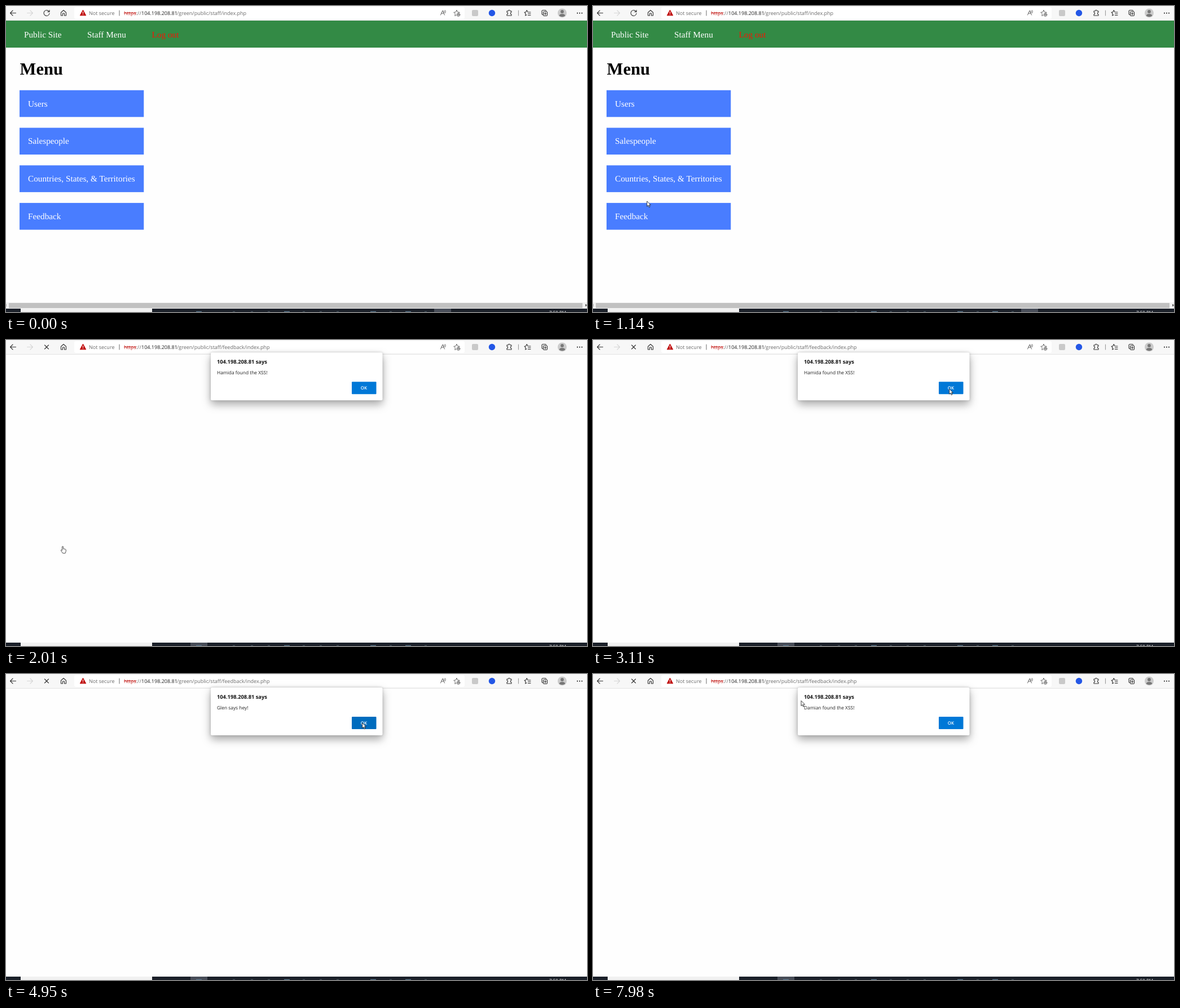
An HTML page for the animation above (8 s loop, 1030 px wide and 544 px high).

```html
<!DOCTYPE html>
<html lang="en">
<head>
<meta charset="utf-8">
<title>Staff menu</title>
<style>
html, body { margin: 0; width: 100%; height: 100%; overflow: hidden; background: #fefefe; }
svg { display: block; width: 1030px; height: 544px; }
text { font-family: "Open Sans", "Noto Sans", sans-serif; text-rendering: geometricPrecision; }
.page text { font: 15.25px "Liberation Serif", "Times New Roman", serif; fill: #fff; }
.page .title { font-size: 30.5px; font-weight: 700; fill: #000; }
.bar text { font-size: 9px; fill: #6a6a6a; }
.icon { fill: none; stroke: #333; stroke-width: 1.1; stroke-linecap: round; stroke-linejoin: round; }
.soft { stroke: #666; stroke-width: 1; }
.box { fill: #fff; filter: drop-shadow(0 7px 8px rgba(0,0,0,.3)) drop-shadow(0 0 2px rgba(0,0,0,.2)); }
</style>
</head>
<body>
<svg viewBox="0 0 1030 544">
  <rect width="1030" height="544" fill="#fefefe"/>

  <g class="bar">
    <rect width="1030" height="26" fill="#f7f7f7"/>
    <rect y="25" width="1030" height="1" fill="#e4e4e4"/>
    <rect x="121" y="2" width="692" height="21" rx="3" fill="#fff"/>
    <g class="icon">
      <path d="M17.500 12.500H7.500M12 8l-4.500 4.500L12 17"/>
      <path d="M37.500 12.500h10M43 8l4.500 4.500L43 17" stroke="#d6d6d6"/>
      <path id="reload" d="M76.500 10.300A5 5 0 1 0 77 13M77 7.300v3.200h-3.200"/>
      <path id="stop" d="M68.500 9l7 7m0-7l-7 7"/>
      <path d="M97.500 11.500l4.500-4 4.500 4V17h-3v-4h-3v4h-3z"/>
      <path d="M201 8v9" stroke="#777"/>
      <path class="soft" d="M770.500 16l3.500-8 3.500 8m-5.800-3h4.500M776.500 8.500q1.300 1 0 3M778.500 7.500q2 2 0 5"/>
      <path class="soft" id="star" d="M799 7.500l1.600 3.300 3.600.5-2.600 2.600M799 7.500l-1.600 3.300-3.600.5 2.600 2.600-.6 3.600 2-.9"/>
      <circle class="soft" cx="802" cy="15.500" r="2.800"/>
      <path class="soft" d="M800.500 15.500h3m-1.500-1.500v3"/>
      <path d="M888 9h2.300a1.700 1.700 0 0 1 3.400 0H896v2.300a1.700 1.700 0 0 0 0 3.400V17h-8v-2.300a1.700 1.700 0 0 0 0-3.400z"/>
      <path d="M908.500 8v9" stroke="#999"/>
      <path d="M926.500 11l-1.500-.3-1.700-3.200-1.600 3.200-2.700.5 2.200 2.300-.5 3.500 2.300-1.200M925.500 11h4.500M925.500 13.800h4.500M925.500 16.500h4.500"/>
      <path d="M951.500 15.500q-1.500 0-1.500-1.500V9.500q0-2 2-2h4q1.500 0 1.500 1.500"/>
      <rect x="952.500" y="10" width="7" height="7.500" rx="1.500"/>
      <path d="M954 13.700h4m-2-2v4"/>
    </g>
    <path d="M136.500 7.500l5 9.200h-10z" fill="#c00c0c" stroke="#c00c0c" stroke-width="1.200" stroke-linejoin="round"/>
    <path d="M136.500 10v3.700m0 1v1.200" stroke="#fff" stroke-width="1.100"/>
    <rect x="826" y="7" width="11" height="11" rx="2" fill="#c9c9c9"/>
    <circle cx="861.500" cy="12.500" r="5.700" fill="#2457e6"/>
    <circle cx="986" cy="12.500" r="8" fill="#cbcbcb"/>
    <circle cx="986" cy="10" r="2.900" fill="#777"/>
    <path d="M980.800 17.500q0-3.500 5.200-3.500t5.200 3.500q-5 3.500-10.400 0" fill="#777"/>
    <path d="M1012 11.700h2v1.700h-2zm4 0h2v1.700h-2zm4 0h2v1.700h-2z" fill="#333"/>
    <text x="147" y="15.800">Not secure</text>
    <text x="209" y="15.800"><tspan fill="#c5221f" text-decoration="line-through">https</tspan>://</text>
    <text x="240" y="15.800" style="fill:#222">104.198.208.81</text>
    <text x="303" y="15.800" id="path"></text>
  </g>

  <g class="page" id="page">
    <rect y="26" width="1030" height="48" fill="#338a45"/>
    <text x="32" y="56">Public Site</text>
    <text x="144" y="56">Staff Menu</text>
    <text x="258.500" y="56" style="fill:#f31505">Log out</text>
    <text x="24.500" y="122" class="title" letter-spacing=".1">Menu</text>
    <g id="items"></g>
    <rect y="527" width="1030" height="11" fill="#f1f1f1"/>
    <rect x="5" y="528" width="1017" height="9" fill="#c1c1c1"/>
    <path d="M0 530v4l-1-2zM1027.500 530v4l2-2z" fill="#444" stroke="#444" stroke-width=".6"/>
  </g>

  <g id="tasks">
    <rect y="538" width="1030" height="6" fill="#1b2029"/>
    <rect x="26" y="538" width="233" height="6" fill="#f1f1f1"/>
    <rect id="active" y="538" width="30" height="6" fill="#484d58"/>
    <text x="963" y="548" font-size="8" fill="#fff">7:50 PM</text>
  </g>

  <g id="dialog">
    <rect class="box" x="363" y="24" width="304.500" height="85" rx="2.500"/>
    <text x="374" y="44" font-size="9.300" font-weight="700" fill="#111">104.198.208.81 says</text>
    <text x="374" y="63" font-size="8.400" fill="#222" id="message"></text>
    <rect x="613" y="76" width="43.500" height="22" rx="1" id="ok"/>
    <text x="634.500" y="89.800" font-size="7.900" font-weight="600" fill="#fff" text-anchor="middle">OK</text>
  </g>

  <g id="cursor" stroke-linejoin="round">
    <path id="arrow" d="M0 0v9.200l2.100-2 1.600 3.600 1.500-.7-1.500-3.400h2.900z" fill="#fff" stroke="#111" stroke-width=".8"/>
    <path id="hand" d="M-1 1q0-1.200 1-1.200t1 1.200v3.200l3 .5q2 .4 1.900 2.200l-.4 2.600-1 2.600H.2L-3 7.500q-.4-1.500 1-1.200l1 .8z" fill="#fff" stroke="#222" stroke-width=".8"/>
  </g>
</svg>
<script>
const $ = id => document.getElementById(id);
const NS = "http://www.w3.org/2000/svg";
const LOOP = 8000, LOAD = 1660, BLANK = 1870;

function add(parent, tag, attrs, text = "") {
  const el = parent.appendChild(document.createElementNS(NS, tag));
  for (const k in attrs) el.setAttribute(k, attrs[k]);
  el.textContent = text;
  return el;
}
const show = (id, on) => $(id).style.display = on ? "" : "none";

const ITEM_H = 47.6;
const items = ["Users", "Salespeople", "Countries, States, & Territories", "Feedback"].map((label, i) => {
  const y = 149.7 + 66.8 * i;
  const rect = add($("items"), "rect", { x: 24, y, width: 220.3, height: ITEM_H });
  add($("items"), "text", { x: 39, y: y + 28.8 }, label);
  return { y, rect };
});

// tips of the taskbar icons that reach into view
[342, 404, 436, 466, 498, 528, 558, 588, 651, 682, 713, 744].forEach((x, i) => {
  const wide = i % 4 == 0 || x == 713;
  add($("tasks"), "rect", {
    x: x - (wide ? 5 : 2), y: 542.8, width: wide ? 10 : 4, height: 1.2,
    fill: wide ? "#5f7f95" : "#46545f"
  });
});

// time, x, y of the pointer's tip
const track = [
  [250, 930, 530], [400, 760, 440], [600, 420, 320], [750, 220, 250], [880, 130, 232],
  [1000, 98, 305], [1070, 96, 335], [1140, 95.7, 347], [1200, 95.7, 347], [1300, 99, 362],
  [1450, 100.5, 367], [2200, 100.5, 367], [2500, 400, 230], [2750, 610, 108], [2840, 637, 86],
  [2910, 631.7, 87], [5500, 631.7, 87], [5900, 640, 98], [6170, 646, 103], [6260, 648, 105],
  [6365, 647.5, 96.5], [6430, 647.5, 96.5], [6500, 642, 90], [6600, 636, 88], [6800, 636, 88],
  [6970, 648, 89], [7040, 648, 89], [7300, 600, 86], [7600, 480, 70], [7840, 377, 50],
  [7910, 371, 48], [7975, 369, 47.5]
];

const alerts = [
  [1935, "Hamida found the XSS!"], [3045, "Hamida found the XSS!"], [3720, "Glen says hey!"],
  [4470, "Glen says hey!"], [5410, "Dale found the XSS!"], [6610, "Damian found the XSS!"]
];
// spans during which the OK button is hovered
const hovers = [[3200, 3720], [3950, 4470], [4760, 5410], [6480, 6610]];

function pointer(t) {
  const n = track.findIndex(k => k[0] > t);
  if (n < 0) return track[track.length - 1].slice(1);
  const [t0, x0, y0] = track[Math.max(n - 1, 0)], [t1, x1, y1] = track[n];
  const p = Math.max(0, (t - t0) / (t1 - t0));
  return [x0 + (x1 - x0) * p, y0 + (y1 - y0) * p];
}

function drawDialog(t) {
  const current = alerts.filter(a => a[0] <= t).pop();
  show("dialog", current);
  if (!current) return;
  const age = t - current[0];
  const rise = age < 62 ? -10 : age < 132 ? -1.7 : 0;
  $("dialog").setAttribute("transform", `translate(0 ${rise})`);
  $("dialog").setAttribute("opacity", age < 62 ? .9 : 1);
  $("message").textContent = current[1];
  const hover = hovers.find(h => t >= h[0] && t < h[1]);
  const k = hover ? Math.min(1, (t - hover[0]) / 180) : 0;
  $("ok").setAttribute("fill", `rgb(0 ${120 - 12 * k} ${215 - 25 * k})`);
}

function draw(now) {
  const t = now % LOOP, loading = t >= LOAD;
  const [x, y] = pointer(t);

  show("page", t < BLANK);
  show("reload", !loading);
  show("stop", loading);
  $("path").textContent = `/green/public/staff/${loading ? "feedback/" : ""}index.php`;
  $("active").setAttribute("x", loading ? 327 : 759);

  let over = false;
  for (const { y: top, rect } of items) {
    const hit = t >= 250 && x > 24 && x < 244 && y > top && y < top + ITEM_H;
    rect.setAttribute("fill", hit ? "#4070e2" : "#497dff");
    over ||= hit;
  }
  const hand = over && t < 2200;
  show("cursor", t >= 250);
  show("hand", hand);
  show("arrow", !hand);
  $("cursor").setAttribute("transform", `translate(${x} ${y})`);

  drawDialog(t);
  requestAnimationFrame(draw);
}
draw(0);
</script>
</body>
</html>
```
